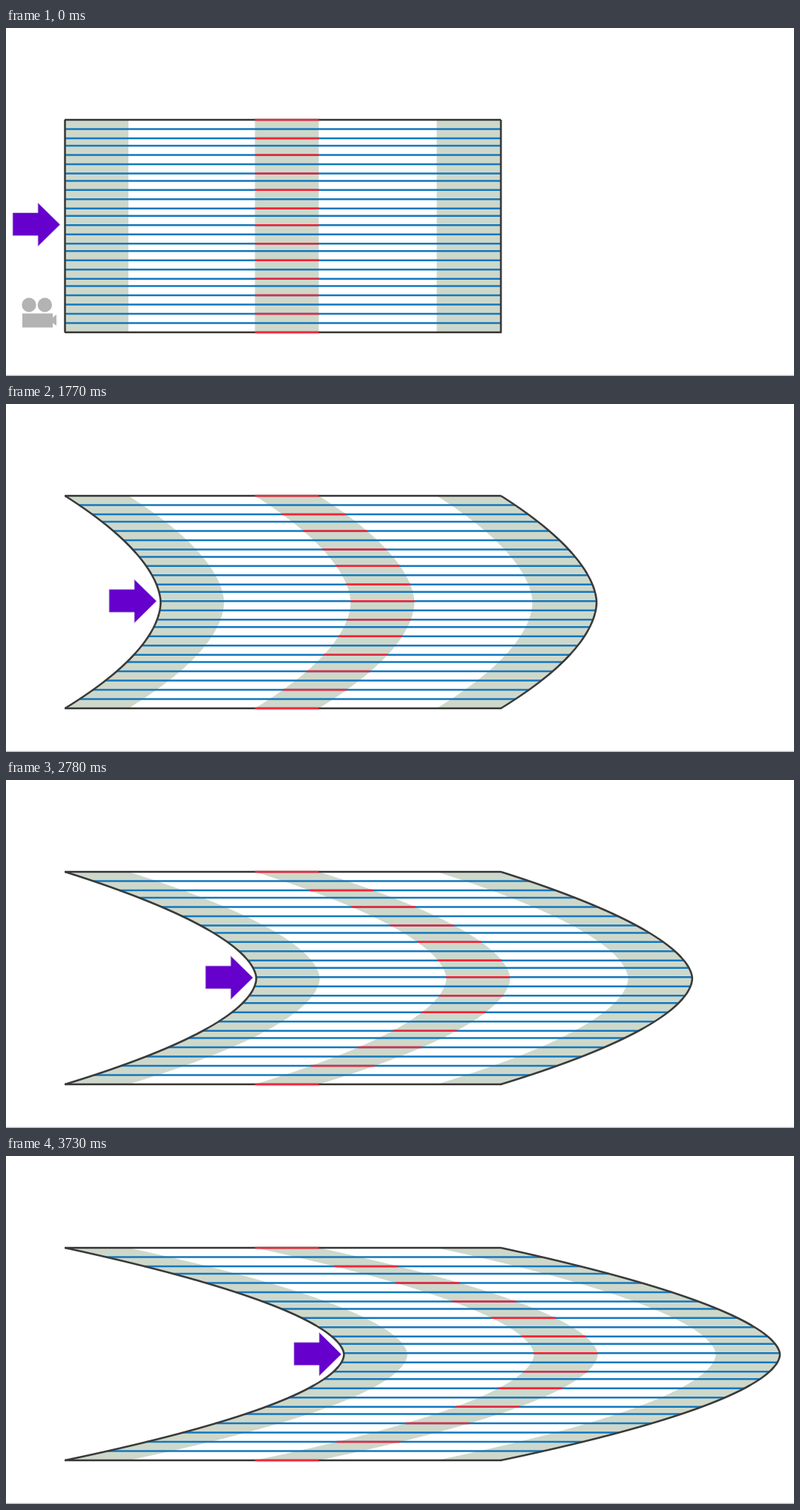
Write an HTML page that moves like this. It is 1062 by 470 pixels and loops after 4.28 s.

```html
<!DOCTYPE html>
<html lang="en">
<head>
<meta charset="utf-8">
<title>Laminar flow profile</title>
<style>
  html, body { margin: 0; width: 100%; height: 100%; overflow: hidden; background: #fff; }
  svg { display: block; width: 100%; height: 100%; }
</style>
</head>
<body>
<svg viewBox="0 0 1062 470">
  <path d="M0 469.5H1062" stroke="#b8b8b8" stroke-width="1.4"/>
  <g id="camera" fill="#b3b3b3">
    <circle cx="31" cy="374" r="9.7"/>
    <circle cx="52.3" cy="374" r="9.7"/>
    <path d="M22 385.5H63V391L68 387V402L63 398.500V404.500H22Z"/>
  </g>
  <path id="bands" fill="#ced8ca"/>
  <g fill="none" stroke-width="2.5">
    <path id="blue" stroke="#1478bd"/>
    <path d="M79 124H667M79 411H668" stroke="#333" stroke-width="2.7"/>
    <path id="red" stroke="#f0253a"/>
    <path id="edges" stroke="#3a3a3a" stroke-width="2.6" stroke-linejoin="round"/>
  </g>
  <path id="arrow" d="M9 249.500H43V236L73 265.500L43 295V280.500H9Z" fill="#6600cc" stroke="#c9bfe0" stroke-width="0.8"/>
</svg>
<script>
const LOOP = 4280, TOP = 124, BOTTOM = 411, MID = 268;
const LEFT = 79.5, RIGHT = 667;
const BANDS = [[LEFT, 165], [335.5, 421.5], [580.5, RIGHT]];

// Start of every flow step; 1290 advances by two.
const STEPS = [
  870, 940, 1070, 1140, 1290, 1290, 1360, 1430, 1500, 1630, 1700, 1770,
  1840, 1970, 2040, 2110, 2180, 2310, 2380, 2450, 2520, 2650, 2720, 2780, 2850,
  2980, 3060, 3130, 3200, 3330, 3400, 3460, 3530, 3660, 3730
];
const MAX_BULGE = 376;

const el = id => document.getElementById(id);
const camera = el('camera'), bands = el('bands'), blue = el('blue');
const red = el('red'), edges = el('edges'), arrow = el('arrow');

const rows = Array.from({ length: 23 }, (_, k) => {
  const i = k + 1;
  return { y: TOP + 2.496 * (Math.round(i * 4.75) + (i > 22 ? 1 : 0)), marked: i % 2 === 0 };
});

const ys = [];
for (let y = TOP; y < BOTTOM; y += 3.5) ys.push(y);
ys.push(BOTTOM);

// Share of the full bulge at height y, zero at both walls.
function profile(y) {
  const above = y < MID;
  const u = above ? (MID - y) / (MID - TOP) : (y - MID) / (BOTTOM - MID);
  return 1 - Math.pow(u, above ? 1.76 : 1.81);
}

const segment = (a, b, y) => `M${a.toFixed(1)} ${y.toFixed(1)}H${b.toFixed(1)}`;

function draw(step) {
  const bulge = MAX_BULGE * step / STEPS.length;
  const shift = y => bulge * profile(y);
  const curve = x => ys.map(y => `${(x + shift(y)).toFixed(1)} ${y}`);
  const line = (a, b, y) => segment(a + shift(y), b + shift(y), y);
  const [, [r0, r1]] = BANDS;

  bands.setAttribute('d', BANDS.map(([a, b]) =>
    `M${curve(a).join('L')}L${curve(b).reverse().join('L')}Z`).join(''));
  blue.setAttribute('d', rows.map(r => line(LEFT, RIGHT, r.y)).join(''));
  red.setAttribute('d', segment(r0, r1, TOP) + segment(r0, r1, BOTTOM) +
    rows.filter(r => r.marked).map(r => line(r0, r1, r.y)).join(''));
  edges.setAttribute('d', [LEFT, RIGHT].map(x => 'M' + curve(x).join('L')).join(''));

  const p = step / STEPS.length;
  arrow.setAttribute('transform', `translate(${(379 * p).toFixed(2)} ${(2.2 * p).toFixed(2)})`);
  camera.style.display = step ? 'none' : '';
}

const start = performance.now();
let shown = -1;
function tick() {
  const t = (performance.now() - start) % LOOP;
  const step = STEPS.filter(s => s <= t).length;
  if (step !== shown) draw(shown = step);
  requestAnimationFrame(tick);
}
tick();
</script>
</body>
</html>
```
